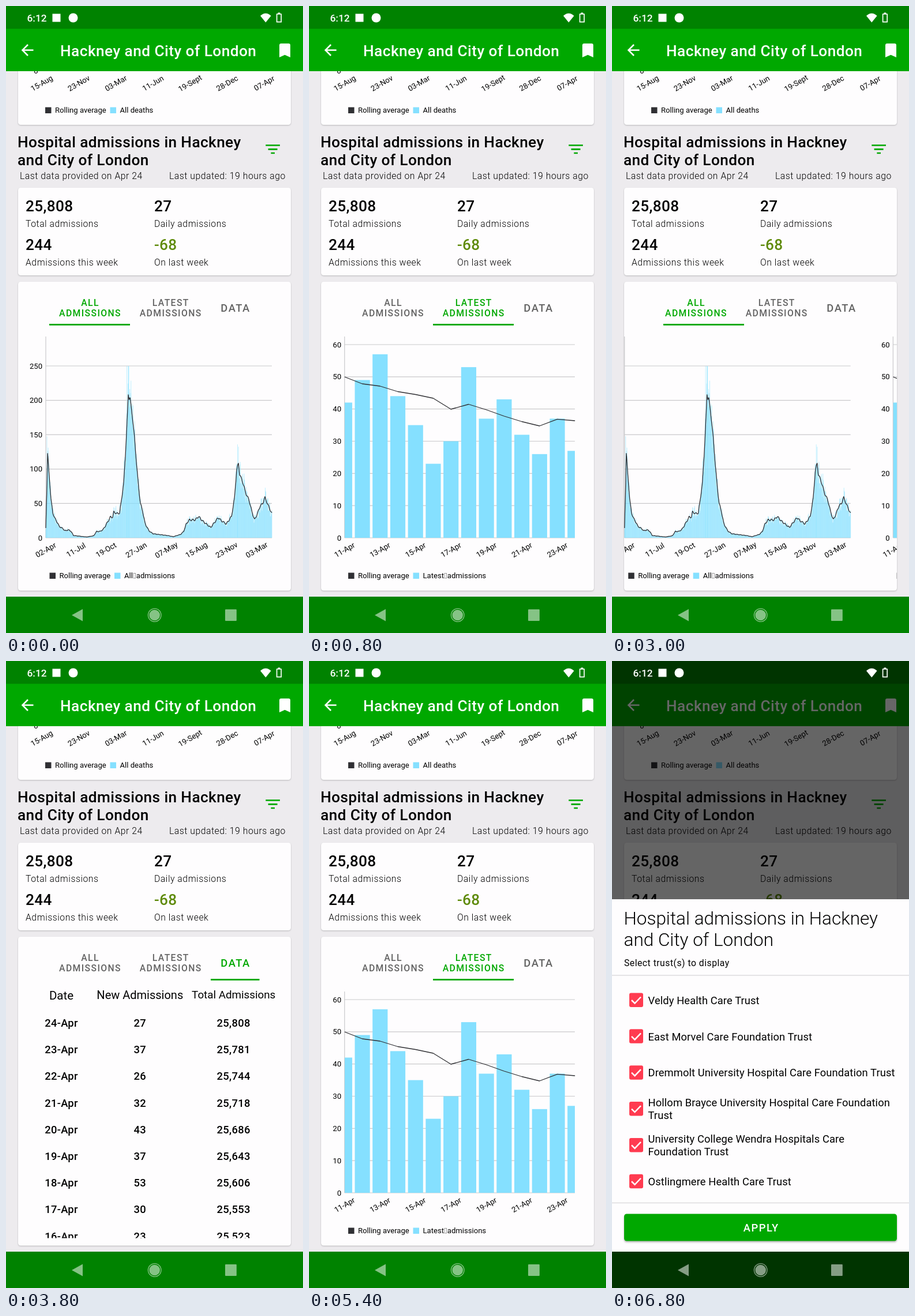
Recreate the animation shown at these times as an HTML page. Size 515 px wide and 1087 px high, loop 8000 ms.

```html
<!DOCTYPE html>
<html lang="en">
<head>
<meta charset="utf-8">
<title>Hospital admissions</title>
<style>
html, body { margin: 0; width: 100%; height: 100%; overflow: hidden; background: #edebee; }
svg { display: block; width: 515px; height: 1087px; font-family: Roboto, sans-serif; }
.h { font-size: 26.2px; font-weight: 500; letter-spacing: .4px; }
.s { font-size: 15.74px; font-weight: 300; letter-spacing: .54px; }
.c { font-size: 13.1px; }
.m { text-anchor: middle; }
.e { text-anchor: end; }
.tab { font-size: 15.74px; font-weight: 500; letter-spacing: 1.4px; text-anchor: middle; fill: #636363; }
.wide { font-size: 18.35px; font-weight: 500; letter-spacing: 1.55px; text-anchor: middle; }
.row { font-size: 18.35px; font-weight: 500; letter-spacing: .35px; text-anchor: middle; }
.opt { font-size: 18.35px; letter-spacing: .1px; }
.card { fill: #fefdfe; filter: drop-shadow(0 1px 1px rgba(0, 0, 0, .22)); }
.line { fill: none; stroke: #303034; stroke-width: 1.3; stroke-linejoin: round; }
</style>
</head>
<body>
<svg id="stage" viewBox="0 0 515 1087"></svg>
<script>
const GREEN = '#00a800', DARK = '#008200', BLUE = '#85e0ff';
const text = (x, y, str, cls, more = '') => `<text x="${x}" y="${y}" class="${cls}" ${more}>${str}</text>`;
const rect = (x, y, w, h, fill, more = '') => `<rect x="${x}" y="${y}" width="${w}" height="${h}" fill="${fill}" ${more}/>`;
const path = (d, more) => `<path d="${d}" ${more}/>`;
const card = (y, h) => rect(21, y, 473, h, '#fefdfe', 'rx="4.5" class="card"');
const stroke = (color, width) => `fill="none" stroke="${color}" stroke-width="${width}"`;

const slanted = (labels, x, step, y) => labels.map((label, i) => {
  const cx = x + i * step;
  return text(cx, y + 4.5, label, 'c m', `transform="rotate(-30 ${cx} ${y})"`);
}).join('');

// Legend; a missing glyph separates the two words of the series name.
function legend(x, y, name, rest) {
  const nameX = x + 129.5;
  let out = rect(x, y - 5, 10.5, 10.5, '#303034') + text(x + 17, y + 4.7, 'Rolling average', 'c') +
    rect(x + 112.5, y - 5, 10.5, 10.5, BLUE) + text(nameX, y + 4.7, name, 'c');
  if (rest) {
    const gap = nameX + (name === 'All' ? 15 : 36.5);
    out += `<rect x="${gap + 1}" y="${y - 4}" width="3.6" height="8.5" ${stroke('#888', .8)}/>` +
      text(gap + 5.8, y + 4.7, rest, 'c');
  }
  return out;
}

function axes(left, step, top, pixelsPerUnit) {
  let out = '';
  for (let v = 0; v <= top; v += step) {
    const y = 922 - v * pixelsPerUnit;
    out += path(`M${left} ${y}H461`, stroke('#c9c9cb', 1.2)) + text(56 + (left > 65 ? 7 : 0), y + 4.5, v, 'c e');
  }
  return out + path(`M${left} 573V922`, stroke('#c9c9cb', 1.2));
}

// Seeded random numbers for the day-to-day scatter
let seed = 7;
const random = () => (seed = seed * 16807 % 2147483647) / 2147483647;

function allPage() {
  const curve = [69,905, 71,830, 72,774, 74,802, 78,855, 81,878, 85,889, 89,895, 92,902, 97,905, 103,910,
    108,908, 113,911, 117,918, 140,920.5, 152,918.5, 157,911, 163,911, 168,908, 172,902, 181,886,
    185,886, 187,877, 192,880, 197,879, 200,858, 204,828, 207,780, 210,720, 212,674, 213.5,681,
    215,678, 220,720, 223,750, 226,790, 230,835, 233,862, 237,876, 241,897, 248,910, 255,915,
    280,918, 290,920, 303,916, 308,911, 313,897, 318,891, 328,891, 334,885, 341,893, 355,904,
    368,887, 373,892, 382,898, 391,885, 396,855, 400,805, 403,792, 405,812, 409,821, 417,848,
    421,855, 426,875, 431,891, 436,880, 441,866, 445,863, 449,852, 453,862, 461,880];
  let bars = '', line = '', k = 0;
  const days = 752;
  for (let i = 0; i < days; i++) {
    const x = 69 + i * 392 / (days - 1);
    while (k < curve.length - 4 && curve[k + 2] < x) k += 2;
    const [x0, y0, x1, y1] = curve.slice(k, k + 4);
    const y = y0 + (y1 - y0) * (x - x0) / (x1 - x0);
    const scatter = 1 + .13 * Math.sin(i * 2 * Math.PI / 7) + (random() - .5) * .34;
    const high = Math.min(298, (922 - y) * scatter);
    bars += `M${x.toFixed(2)} 922V${(922 - high).toFixed(1)}`;
    const wobble = Math.sin(i * .55) * Math.min(1.5, (922 - y) / 20);
    line += (line ? 'L' : 'M') + x.toFixed(1) + ' ' + (y + wobble).toFixed(1);
  }
  const spikes = 'M71 922V746M209.5 922V624M213 922V625M401.5 922V760';
  return axes(69, 50, 250, 1.192) + path(bars, stroke(BLUE, .53)) +
    path(spikes, stroke(BLUE, .5)) + path(line, 'class="line"') +
    slanted(['02-Apr', '11-Jul', '19-Oct', '27-Jan', '07-May', '15-Aug', '23-Nov', '03-Mar'], 69, 52.25, 943) +
    legend(75.5, 987.5, 'All', 'admissions');
}

const daily = [42, 49, 57, 44, 35, 23, 30, 53, 37, 43, 32, 26, 37, 27];

function latestPage() {
  const average = [643, 655, 659, 668.5, 673.5, 680, 699, 690.5, 700, 711, 720.5, 728, 716.3, 719];
  const x = i => 61.7 + i * 30.73;
  const bars = daily.map((v, i) => {
    const from = Math.max(62, x(i) - 13), to = Math.min(461, x(i) + 13.2);
    return rect(from, 922 - v * 5.583, to - from, v * 5.583, BLUE);
  }).join('');
  return axes(61.7, 10, 60, 5.583) + bars +
    path('M' + average.map((y, i) => x(i) + ' ' + y).join('L'), 'class="line"') +
    slanted([11, 13, 15, 17, 19, 21, 23].map(d => d + '-Apr'), 61.7, 61.5, 943) +
    legend(68, 987.5, 'Latest', 'admissions');
}

function dataPage() {
  let total = 25808;
  let out = text(96, 586.7, 'Date', 'm', 'font-size="20.5"') +
    text(232.3, 586, 'New Admissions', 'm', 'font-size="20"') +
    text(394.7, 585, 'Total Admissions', 'm', 'font-size="18.8"');
  for (let i = 0; i < 9; i++) {
    const y = 634 + i * 46.2, fresh = daily[13 - i];
    out += text(96, y, 24 - i + '-Apr', 'row') + text(232.3, y, fresh, 'row') +
      text(394.7, y, total.toLocaleString('en-US'), 'row');
    total -= fresh;
  }
  return `<g clip-path="url(#tableClip)">${out}</g>`;
}

const stat = (x, y, value, label, fill = '#000') =>
  text(x, y, value, 'h', `fill="${fill}"`) + text(x, y + 26.5, label, 's');

const page = rect(0, 0, 515, 1087, '#edebee') +
  card(90, 116) + text(55.5, 116.5, '0', 'c e') +
  slanted(['15-Aug', '23-Nov', '03-Mar', '11-Jun', '19-Sept', '28-Dec', '07-Apr'], 62, 64.3, 134) +
  legend(68, 180.5, 'All deaths') +
  text(20, 245.3, 'Hospital admissions in Hackney', 'h') + text(20, 275.7, 'and City of London', 'h') +
  text(24, 300, 'Last data provided on Apr 24', 's') + text(283, 300, 'Last updated: 19 hours ago', 's') +
  path('M450.3 241.5H475M454.6 248.3H470.6M459.4 255H466', stroke(GREEN, 2.7)) +
  card(315, 152) +
  stat(34, 356, '25,808', 'Total admissions') + stat(257, 356, '27', 'Daily admissions') +
  stat(34, 423, '244', 'Admissions this week') + stat(257, 423, '-68', 'On last week', '#5f8b0a') +
  card(478, 535.5) +
  `<g class="tab">${text(146, 519.5, 'ALL', 'tab')}${text(146, 538.2, 'ADMISSIONS', 'tab')}</g>` +
  `<g class="tab">${text(285.7, 519.5, 'LATEST', 'tab')}${text(285.7, 538.2, 'ADMISSIONS', 'tab')}</g>` +
  `<g class="tab">${text(398, 530, 'DATA', 'wide')}</g>` +
  '<rect id="underline" y="551" height="2.8" fill="#00a800"/>' +
  `<g clip-path="url(#pagerClip)">${[allPage(), latestPage(), dataPage()].map(p => `<g class="page">${p}</g>`).join('')}</g>` +
  rect(0, 0, 515, 40, DARK) + rect(0, 39.5, 515, 73.5, GREEN) + rect(0, 1024, 515, 63, DARK) +
  path('M47.5 76.5H28.5M38 67L28.5 76.5L38 86', stroke('#fff', 2.6)) +
  text(94, 86.8, 'Hackney and City of London', 'h', 'fill="#fff" style="letter-spacing:.46px"') +
  path('M474 68q0-3 3-3h13q3 0 3 3v21l-9.5-4.2-9.5 4.2z', 'fill="#fff"');

const trusts = [
  ['Veldy Health Care Trust'],
  ['East Morvel Care Foundation Trust'],
  ['Dremmolt University Hospital Care Foundation Trust'],
  ['Hollom Brayce University Hospital Care Foundation', 'Trust'],
  ['University College Wendra Hospitals Care', 'Foundation Trust'],
  ['Ostlingmere Health Care Trust']
];
const option = (lines, i) => {
  const y = 588 + i * 62.85;
  return rect(30, y - 12.5, 24, 24.5, '#ff3b50', 'rx="3"') +
    path(`M34 ${y}l5.5 5.5L50 ${y - 5.5}`, stroke('#fff', 2.5)) +
    lines.map((line, k) => text(62.5, y + 6.7 + (k - (lines.length - 1) / 2) * 21.7, line, 'opt')).join('');
};
const sheet = rect(0, 413, 515, 611, '#fefdfe') +
  text(20.5, 457, 'Hospital admissions in Hackney', '', 'font-size="31.5" font-weight="300"') +
  text(20.5, 493.8, 'and City of London', '', 'font-size="31.5" font-weight="300"') +
  text(21, 529.3, 'Select trust(s) to display', '', 'font-size="15.74" letter-spacing=".5"') +
  rect(0, 544.3, 515, 1.3, '#d9d8da') + trusts.map(option).join('') + rect(0, 938.8, 515, 1.3, '#d9d8da') +
  rect(21, 958.5, 473, 47, GREEN, 'rx="4.5" style="filter:drop-shadow(0 2px 1.5px rgba(0,0,0,.3))"') +
  text(258.8, 989.3, 'APPLY', 'wide', 'fill="#fff"');

const systemIcons = text(36.5, 26.6, '6:12', '', 'font-size="17.3" font-weight="500" fill="#fff"') +
  rect(80.5, 13.5, 14, 14, '#fff') + '<circle cx="116.5" cy="20.5" r="8" fill="#fff"/>' +
  path('M450.3 28.5L441 17q9.3-8.6 18.6 0z', 'fill="#fff"') +
  path('M469.6 14v13.7h7.6v-13.7z', stroke('#fff', 1.7) + ' stroke-linejoin="round"') + rect(471.4, 11.5, 4, 2.5, '#fff') +
  '<g fill="#fff" opacity=".52"><path d="M114 1056L133 1045.5V1066.5z"/><circle cx="257.7" cy="1056" r="9.3"/>' +
  `<circle cx="257.7" cy="1056" r="11.3" ${stroke('#fff', 1.3)}/>` +
  '<rect x="380" y="1046" width="19.8" height="20" rx="1"/></g>';

const clip = (id, x, y, w, h) => `<clipPath id="${id}">${rect(x, y, w, h, '#000')}</clipPath>`;
const stage = document.getElementById('stage');
stage.innerHTML = `<defs>${clip('pagerClip', 21, 556, 473, 457)}${clip('tableClip', 21, 556, 473, 444.5)}` +
  `${clip('sheetClip', 0, 0, 515, 1024)}</defs>` + page +
  '<circle id="ripple" cx="462.7" cy="248" r="28" fill="#fff" opacity=".15"/>' +
  '<circle id="touch" r="16" fill="#fff" fill-opacity=".5" stroke="#a5a5a8" stroke-width="1.6"/>' +
  rect(0, 0, 515, 1087, '#000', 'id="scrim"') +
  `<g clip-path="url(#sheetClip)"><g id="sheet">${sheet}</g></g>` + systemIcons;

const $ = id => document.getElementById(id);
const pages = [...document.querySelectorAll('.page')];
const tabs = [...document.querySelectorAll('g.tab')];
const tabEdges = [75, 215, 355, 439.5];
const tabCentres = [145, 285, 397];

// [touch start, slide start, tab]
const moves = [[500, 600, 1], [1200, 1300, 2], [2000, 2100, 1], [2800, 2900, 0], [3500, 3600, 2], [5000, 5200, 1]];
const slide = [.45, .9, 1];
const rise = [.35, .8, 1];
const TICK = 100, LOOP = 8000;
const at = (steps, t, start) => t < start ? 0 : steps[Math.min(steps.length - 1, (t - start) / TICK)];
const mix = (a, b, p) => a + (b - a) * p;

function render(t) {
  let tab = 0, position = 0, left = tabEdges[0], right = tabEdges[1], touch = null;
  for (const [down, start, next] of moves) {
    if (t >= down && t < start) touch = [tabCentres[next], 525];
    if (t < start) break;
    const p = at(slide, t, start);
    position = mix(tab, next, p);
    left = mix(tabEdges[tab], tabEdges[next], p);
    right = mix(tabEdges[tab + 1], tabEdges[next + 1], p);
    tab = next;
  }
  const pressed = t >= 6400 && t < 6600;
  if (pressed) touch = [458, 240];

  pages.forEach((p, i) => p.setAttribute('transform', `translate(${(i - position) * 473} 0)`));
  tabs.forEach((g, i) => [...g.children].forEach(label => label.style.fill = i === tab ? GREEN : '#636363'));
  $('underline').setAttribute('x', left);
  $('underline').setAttribute('width', right - left);
  $('ripple').style.display = pressed ? '' : 'none';
  $('touch').style.display = touch ? '' : 'none';
  if (touch) $('touch').setAttribute('transform', `translate(${touch})`);

  const open = at(rise, t, 6600);
  $('scrim').setAttribute('opacity', .6 * open);
  $('sheet').setAttribute('transform', `translate(0 ${(1 - open) * 611})`);
}

const begin = performance.now();
function frame() {
  const t = (performance.now() - begin) % LOOP;
  render(Math.floor(t / TICK) * TICK);
  requestAnimationFrame(frame);
}
frame();
</script>
</body>
</html>
```
